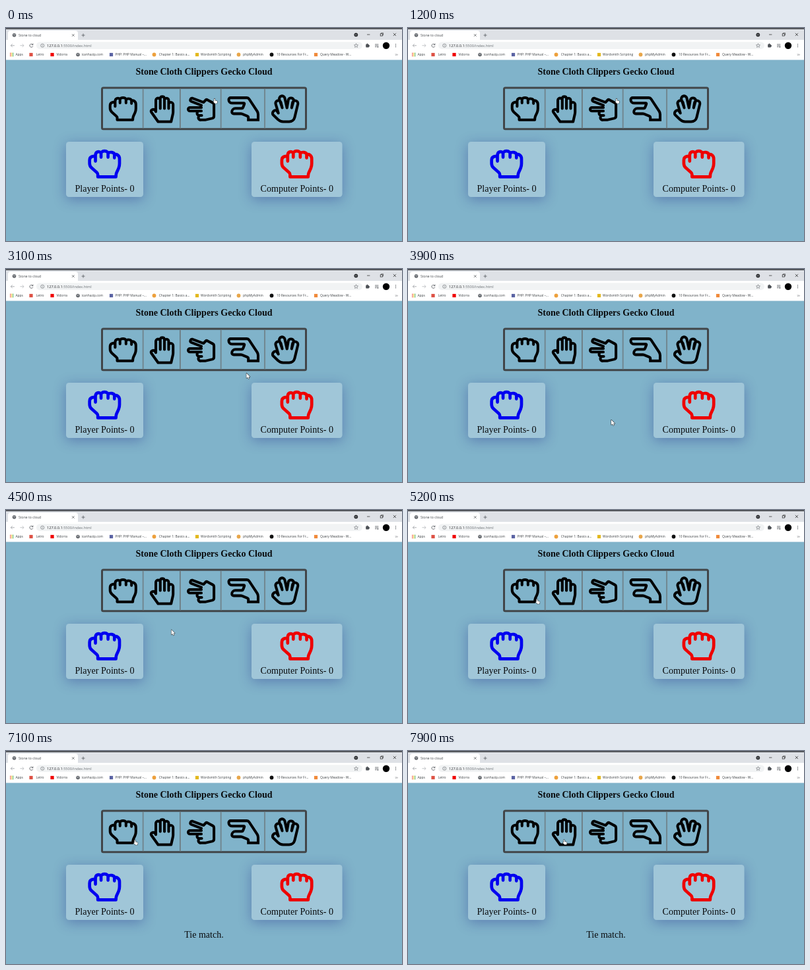
Recreate the animation shown at these times as an HTML page with a canvas. Size 600x324 px, loop 8 s.

```html
<!DOCTYPE html>
<html lang="en">
<head>
<meta charset="utf-8">
<title>Stone to cloud</title>
<style>
  html, body { margin: 0; width: 100%; height: 100%; overflow: hidden; background: #80b3ca; }
  canvas { display: block; width: 600px; height: 324px; }
</style>
</head>
<body>
<canvas id="stage"></canvas>
<script>
const W = 600, H = 324, LOOP = 8000;
const canvas = document.getElementById('stage');
const dpr = window.devicePixelRatio || 1;
canvas.width = W * dpr;
canvas.height = H * dpr;
const ctx = canvas.getContext('2d');
ctx.scale(dpr, dpr);

const UI = '"Open Sans", "Noto Sans", sans-serif';
const SERIF = '"Liberation Serif", "Times New Roman", serif';

// Hand outlines as centre lines on a 512 unit grid
const hands = {
  rock: 'M152 456 V424 Q152 402 136 388 L56 316 Q24 288 24 246 V196 C24 138 80 126 115 146 V212 ' +
    'V122 C115 64 168 48 202 84 V150 V88 A54 34 0 0 1 310 88 V150 V90 A54 38 0 0 1 409 108 V160 ' +
    'V112 C440 94 488 120 488 176 V250 Q488 290 474 322 L442 392 Q432 416 432 456 Z',
  paper: 'M113 306 L101 284 C72 248 6 280 32 316 L154 488 H388 L419 351 Q424 332 424 311 V179 ' +
    'A40 40 0 0 0 344 179 V250 V102 A38 38 0 0 0 268 102 V250 V67 A38 38 0 0 0 193 67 V250 V102 ' +
    'A40 40 0 0 0 113 102 Z',
  scissors: 'M262 192 L78 122 A32 32 0 0 1 102 64 L300 138 L340 96 Q352 84 368 92 L470 148 ' +
    'Q488 158 488 182 V386 Q488 418 458 427 L340 454 Q332 456 324 456 H256 A40 40 0 0 1 240 376 ' +
    'H224 A40 40 0 0 1 224 296 H56 A32 32 0 0 1 56 232 H262 M224 296 H262 M240 376 H268',
  lizard: 'M552 456 H376 V408 Q376 394 362 388 L262 347 Q254 344 244 344 H112 A32 32 0 0 1 80 312 ' +
    'A64 64 0 0 1 144 248 H258 Q274 248 280 232 L304 170 Q310 152 292 152 H80 A56 56 0 0 1 24 96 ' +
    'V88 A32 32 0 0 1 56 56 H350 Q376 56 390 78 L537 303 Q552 328 552 356 Z',
  salute: 'M136 334 L108 293 C66 256 4 330 43 367 L132 452 Q166 488 221 488 H328 ' +
    'A103 103 0 0 0 429 408 L487 166 A50 50 0 0 0 390 143 L374 238 L411 104 A50 50 0 0 0 315 91 ' +
    'L290 238 L250 61 A50 50 0 0 0 153 86 L205 238 L181 140 A49 49 0 0 0 87 169 Z'
};
for (const name in hands) hands[name] = new Path2D(hands[name]);

const arrow = new Path2D('M0 0 V7.6 L1.8 6 L3 8.6 L4.2 8 L3.1 5.5 H5.4 Z');
const pointer = new Path2D('M1.3 1 Q2 -.2 2.7 1 V3.4 L5.2 3.8 Q6.3 4.1 6.2 5.2 L5.6 7.8 ' +
  'H2.6 L.2 5.2 Q0 4 1.3 4.6 Z');

function rect(x, y, w, h, fill) {
  ctx.fillStyle = fill;
  ctx.fillRect(x, y, w, h);
}

function round(x, y, w, h, r, fill) {
  ctx.beginPath();
  ctx.roundRect(x, y, w, h, r);
  ctx.fillStyle = fill;
  ctx.fill();
}

function dot(x, y, r, fill) {
  ctx.beginPath();
  ctx.arc(x, y, r, 0, 7);
  ctx.fillStyle = fill;
  ctx.fill();
}

function line(d, color, width = 0.8) {
  ctx.strokeStyle = color;
  ctx.lineWidth = width;
  ctx.stroke(new Path2D(d));
}

function text(str, x, y, font, fill, align = 'left') {
  ctx.font = font;
  ctx.fillStyle = fill;
  ctx.textAlign = align;
  ctx.fillText(str, x, y);
}

function hand(name, x, y, scale, color) {
  ctx.save();
  ctx.translate(x, y);
  ctx.scale(scale, scale);
  ctx.lineWidth = 48;
  ctx.lineCap = 'round';
  ctx.lineJoin = name === 'lizard' ? 'miter' : 'round';
  ctx.strokeStyle = color;
  ctx.stroke(hands[name]);
  ctx.restore();
}

function globe(x, y) {
  dot(x, y, 2.8, '#5f6368');
  line(`M${x - 1.9} ${y - 1} l1.6 .4 l.6 1.6 M${x + 0.6} ${y - 2} l1.3 1.6`, '#e8eaed', 0.7);
}

function tabStrip() {
  rect(0, 0, W, 19, '#dee1e6');
  rect(0, 0, W, 2, '#55585d');
  round(3, 4, 106, 18, 4, '#fff');
  globe(12.5, 10.8);
  text('Stone to cloud', 19, 12.7, '5.1px ' + UI, '#45494d');
  line('M100 9.2 l3.6 3.6 m0 -3.6 l-3.6 3.6', '#45494d', 0.7);
  line('M114.5 11 h5 m-2.5 -2.5 v5', '#55595e', 0.8);
  dot(530.3, 10.3, 2.9, '#2b2d30');
  line('M529 9.7 l1.3 1.4 l1.3 -1.4', '#e4e6ea', 0.7);
  line('M547 10 h4.4 M586.8 7.8 l4.2 4.2 m0 -4.2 l-4.2 4.2', '#222', 0.7);
  ctx.strokeRect(567.2, 8.8, 3.2, 3.2);
  line('M568.4 8.6 v-1 h3.2 v3.2 h-1', '#222', 0.6);
}

function addressBar() {
  rect(0, 18, W, 30.5, '#fff');
  line('M12.9 26.7 h-5.6 m2.4 -2.4 l-2.4 2.4 l2.4 2.4', '#9a9da1', 0.8);
  line('M21.4 26.7 h5.6 m-2.4 -2.4 l2.4 2.4 l-2.4 2.4', '#b6b9bd', 0.8);
  line('M40.4 25.2 A2.5 2.5 0 1 0 40.8 27.6 M40.9 23.6 v2 h-2', '#5f6368', 0.9);
  round(46, 21.3, 494, 10.6, 5.3, '#f1f3f4');
  line('M57.8 26.7 a2.6 2.6 0 1 0 -5.2 0 a2.6 2.6 0 1 0 5.2 0 M55.2 26.3 v1.8 M55.2 25 v.6', '#5f6368', 0.6);
  const font = '5.6px ' + UI;
  text('127.0.0.1', 62, 28.6, font, '#26282b');
  text(':5500/index.html', 62 + ctx.measureText('127.0.0.1').width, 28.6, font, '#6b7075');
  line('M530.5 23.7 l.9 2 l2.1 .2 l-1.6 1.4 l.5 2.1 l-1.9 -1.1 l-1.9 1.1 l.5 -2.1 l-1.6 -1.4 l2.1 -.2 Z', '#5f6368', 0.6);
  round(545.2, 24.8, 4.8, 4.8, 0.8, '#4d5156');
  dot(547.4, 24.6, 1, '#4d5156');
  dot(550.2, 27.2, 1, '#4d5156');
  line('M559 24.9 h5.4 M559 26.8 h5.4 M559 28.7 h2.6', '#5f6368', 0.8);
  dot(563.4, 28.8, 1, '#5f6368');
  dot(576, 26.7, 5.2, '#000');
  for (let i = -1; i < 2; i++) dot(590.5, 26.7 + i * 2, 0.65, '#5f6368');
}

// icon x, label x, label, colour, shape
const bookmarks = [
  [38, 45.7, 'Letro', '#dd5144', 'square'],
  [70, 76.4, 'Vidorra', '#f00000', 'square'],
  [109, 114.5, 'icanhazip.com', '', 'globe'],
  [159.5, 165.5, 'PHP: PHP Manual –…', '#5a63a3', 'square'],
  [224.5, 231.7, 'Chapter 1: Basics a…', '#eda03c', 'circle'],
  [289.5, 295, 'Wordsmith Scripting', '#e3b81e', 'square'],
  [352.5, 359, 'phpMyAdmin', '#e8a64a', 'circle'],
  [402.5, 410, '10 Resources For Fr…', '#111', 'circle'],
  [469.5, 476, 'Query Meadow - W…', '#f08a3a', 'square']
];

function bookmarkBar() {
  const colors = ['#ea4335', '#fbbc05', '#34a853', '#4285f4'];
  for (let i = 0; i < 9; i++)
    rect(6 + (i % 3) * 2, 37.8 + (i / 3 | 0) * 2, 1.3, 1.3, colors[(i + (i / 3 | 0)) % 4]);
  const font = '4.88px ' + UI;
  text('Apps', 14.4, 42.3, font, '#3c4043');
  for (const [ix, x, label, color, shape] of bookmarks) {
    if (shape === 'globe') globe(ix, 40.5);
    else if (shape === 'circle') dot(ix, 40.5, 2.9, color);
    else rect(ix - 2.6, 37.9, 5.2, 5.2, color);
    text(label, x, 42.3, font, '#3c4043');
  }
  line('M590 39.4 l1.2 1.2 l-1.2 1.2 m2 -2.4 l1.2 1.2 l-1.2 1.2', '#5f6368', 0.7);
}

function panel() {
  ctx.strokeStyle = '#414548';
  ctx.lineWidth = 3;
  ctx.beginPath();
  ctx.roundRect(145.5, 91, 309, 62.7, 2);
  ctx.stroke();
  for (const x of [207.7, 264, 325.7, 392.2]) {
    rect(x - 0.9, 92.5, 0.9, 60, '#64737a');
    rect(x, 92.5, 0.9, 60, '#75858c');
  }
  const row = { rock: 155.7, paper: 217.5, scissors: 274, lizard: 335.5, salute: 401.3 };
  for (const name in row) hand(name, row[name], 101.4, 0.0842, '#000');
}

function card(x, w, label, color) {
  const y = 173, h = 84;
  ctx.save();
  ctx.beginPath();
  ctx.rect(0, 48, W, H);
  ctx.roundRect(x, y, w, h, 4.5);
  ctx.clip('evenodd');
  ctx.shadowColor = 'rgba(31, 38, 135, 0.37)';
  ctx.shadowBlur = 19 * dpr;
  ctx.shadowOffsetY = 4 * dpr;
  round(x, y, w, h, 4.5, '#80b3ca');
  ctx.restore();
  round(x, y, w, h, 4.5, 'rgba(255, 255, 255, 0.25)');
  hand('rock', x + w / 2 - 25.2, 181.9, 0.0977, color);
  text(label, x + w / 2, 249, '14.1px ' + SERIF, '#080a0c', 'center');
}

// time, x, y of the cursor tip
const moves = [
  [0, 314, 107], [1500, 314, 107], [2050, 421, 87], [2500, 421, 87],
  [3700, 308, 229.5], [4100, 308, 229.5], [4900, 193.5, 135],
  [7100, 193.5, 135], [7700, 234.5, 134.5], [LOOP, 234.5, 134.5]
];

function cursor(t) {
  const i = moves.findIndex(m => m[0] > t);
  const [t0, x0, y0] = moves[i - 1], [t1, x1, y1] = moves[i];
  const p = (t - t0) / (t1 - t0), e = p * p * (3 - 2 * p);
  const x = x0 + (x1 - x0) * e, y = y0 + (y1 - y0) * e;
  const over = x > 144 && x < 456 && y > 90 && y < 155;
  const shape = over ? pointer : arrow;
  ctx.save();
  ctx.translate(x, y);
  ctx.lineJoin = 'round';
  ctx.strokeStyle = '#30383c';
  ctx.lineWidth = 1.1;
  ctx.stroke(shape);
  ctx.fillStyle = '#fff';
  ctx.fill(shape);
  ctx.restore();
}

function draw(t) {
  rect(0, 0, W, H, '#80b3ca');
  tabStrip();
  addressBar();
  bookmarkBar();
  text('Stone Cloth Clippers Gecko Cloud', 300, 70.5, 'bold 14px ' + SERIF, '#080a0c', 'center');
  panel();
  card(91, 117, 'Player Points- 0', '#0000f0');
  card(372, 137.5, 'Computer Points- 0', '#ee0000');
  if (t >= 5400) text('Tie match.', 300, 283.5, '14px ' + SERIF, '#080a0c', 'center');
  cursor(t);
}

const start = performance.now();
function frame(now) {
  draw(Math.max(0, now - start) % LOOP);
  requestAnimationFrame(frame);
}
draw(0);
requestAnimationFrame(frame);
</script>
</body>
</html>
```
